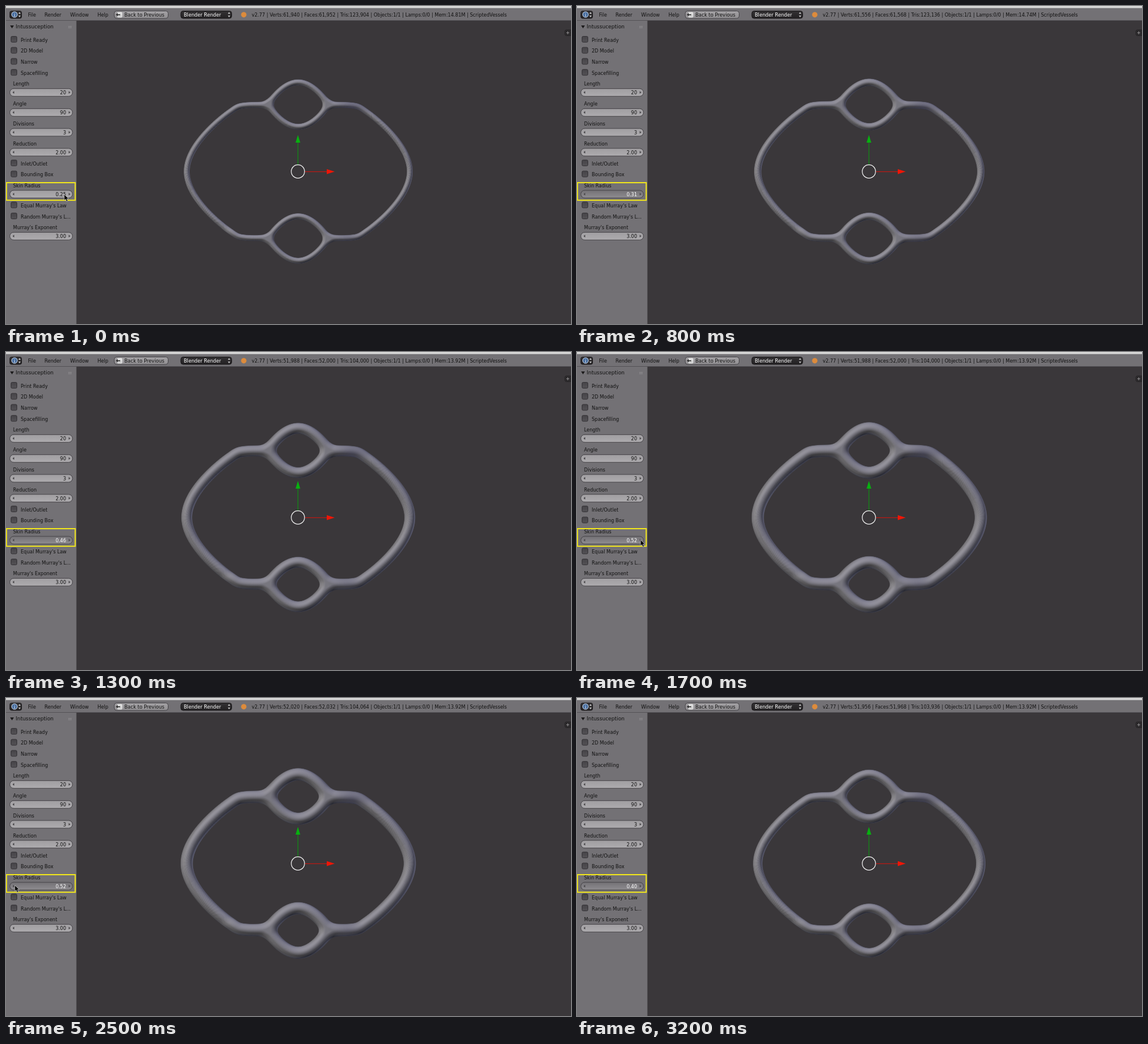
Write an HTML page with a canvas that moves like this. It is 960x540 px and loops after 3.3 s.

```html
<!DOCTYPE html>
<html lang="en">
<head>
<meta charset="utf-8">
<title>Skin radius</title>
<style>
html, body { margin: 0; width: 100%; height: 100%; overflow: hidden; background: #3a373a; }
canvas { display: block; width: 960px; height: 540px; }
</style>
</head>
<body>
<canvas id="stage" width="960" height="540"></canvas>
<script>
const STEP = 100, STEPS = 33;
const ctx = document.getElementById('stage').getContext('2d');

// [step, skin radius], linear in between
const RADIUS = [[0, .25], [6, .25], [8, .31], [12, .45], [13, .46], [17, .52],
  [19, .55], [24, .55], [27, .46], [31, .40], [32, .40]];
// [step, vertices, memory], held
const STATS = [[0, 61940, '14.81'], [8, 61556, '14.74'], [11, 51956, '13.92'],
  [13, 51988, '13.92'], [19, 52020, '13.92'], [28, 51988, '13.92'], [30, 51956, '13.92']];
// [step, x, y], held; no x means hidden
const POINTER = [[0, 99, 320], [7], [17, 108, 319], [19, 78, 318], [20, 46, 318],
  [21, 28, 317.5], [22, 22, 318], [24, 15, 318], [28]];

const held = (table, step) => table.filter(row => row[0] <= step).pop();
const pressed = step => (step >= 6 && step < 19) || step >= 25;

function radiusAt(step) {
  const i = Math.max(1, RADIUS.findIndex(row => row[0] >= step));
  const [s0, r0] = RADIUS[i - 1], [s1, r1] = RADIUS[i];
  return Math.round((r0 + (r1 - r0) * (step - s0) / (s1 - s0)) * 100) / 100;
}

function makeLayer(width = 960, height = 540) {
  const c = document.createElement('canvas');
  c.width = width;
  c.height = height;
  return c.getContext('2d');
}

function text(g, str, x, y, { size = 8.03, color = '#111', align = 'left' } = {}) {
  g.font = `${size}px "DejaVu Sans", sans-serif`;
  g.fillStyle = color;
  g.textAlign = align;
  g.fillText(str, x, y + 3);
}

function poly(g, points, color) {
  g.beginPath();
  points.forEach(([x, y]) => g.lineTo(x, y));
  g.closePath();
  g.fillStyle = color;
  g.fill();
}

function box(g, x, y, w, h, r, top, bottom, edge) {
  const fill = g.createLinearGradient(0, y, 0, y + h);
  fill.addColorStop(0, top);
  fill.addColorStop(1, bottom);
  g.beginPath();
  g.roundRect(x, y, w, h, r);
  g.fillStyle = fill;
  g.fill();
  g.strokeStyle = edge;
  g.lineWidth = 1;
  g.stroke();
}

function slider(g, y, value, down) {
  const shades = down ? ['#747276', '#8e8c90'] : ['#a09ea1', '#adabae'];
  box(g, 6.5, y - 6.5, 106.5, 13, 6.5, ...shades, '#464448');
  for (const [x, d] of [[11, 3], [109.5, -3]])
    poly(g, [[x, y], [x + d, y - 2.2], [x + d, y + 2.2]], '#4a484b');
  text(g, value, 102, y + .5, { align: 'right', color: down ? '#fff' : '#111' });
}

function checkbox(g, y, label) {
  box(g, 8.5, y - 5.5, 10, 10, 2, '#464448', '#535155', '#343236');
  text(g, label, 25, y + .5);
}

function chevrons(g, x, y) {
  poly(g, [[x - 2, y - 1.5], [x + 2, y - 1.5], [x, y - 4.5]], '#ccc');
  poly(g, [[x - 2, y + 1.5], [x + 2, y + 1.5], [x, y + 4.5]], '#ccc');
}

function drawHeader(g) {
  g.fillStyle = '#737175';
  g.fillRect(0, 0, 960, 25);
  g.fillStyle = '#d8d8d7';
  g.fillRect(0, 0, 960, 3.5);
  g.fillStyle = '#545256';
  g.fillRect(0, 24, 960, 1);

  box(g, 6.5, 8.5, 20, 12.5, 3, '#343234', '#232123', '#1a181a');
  g.beginPath();
  g.arc(14.5, 14.5, 4.8, 0, 7);
  g.fillStyle = '#4a6fa0';
  g.fill();
  g.strokeStyle = '#d5dfec';
  g.stroke();
  text(g, 'i', 14.5, 14.6, { size: 7.5, color: '#fff', align: 'center' });
  chevrons(g, 23, 14.7);

  [['File', 37.5], ['Render', 65.5], ['Window', 109], ['Help', 155.5]]
    .forEach(([label, x]) => text(g, label, x, 15));

  box(g, 184, 8.5, 91.5, 12.5, 4, '#a3a1a4', '#918f92', '#464448');
  box(g, 189.5, 11, 7.5, 8, 1, '#e0e0e0', '#c4c4c4', '#eee');
  poly(g, [[186.5, 14.8], [190, 12], [190, 17.6]], '#333');
  g.fillStyle = '#333';
  g.fillRect(190, 14, 4, 1.6);
  text(g, 'Back to Previous', 201, 15, { size: 8.2 });

  box(g, 297, 8.5, 86.5, 12.5, 4, '#333133', '#232123', '#191719');
  text(g, 'Blender Render', 302, 15, { size: 8.2, color: '#fff' });
  chevrons(g, 379, 14.7);

  g.beginPath();
  g.arc(404, 14.8, 4.6, 0, 7);
  g.fillStyle = '#dc8b3c';
  g.fill();
}

function drawPanel(g) {
  g.fillStyle = '#737175';
  g.fillRect(0, 25, 119.5, 515);
  g.fillStyle = '#5c5a5e';
  g.fillRect(119, 25, 1, 515);
  poly(g, [[7, 33], [13.4, 33], [10.2, 38]], '#1b1a1b');
  text(g, 'Intussuception', 16.5, 35.4, { size: 8.75 });
  g.fillStyle = '#9b999c';
  for (let x = 106; x < 112; x += 2)
    for (const y of [34, 36.3]) g.fillRect(x, y, 1.2, 1.2);

  [['Print Ready', 57], ['2D Model', 75.7], ['Narrow', 94.5], ['Spacefilling', 113.2],
   ['Inlet/Outlet', 267], ['Bounding Box', 285.7], ['Equal Murray\'s Law', 338.3],
   ['Random Murray\'s L...', 357]].forEach(([label, y]) => checkbox(g, y, label));

  [['Length', 132, '20'], ['Angle', 166, '90'], ['Divisions', 199.7, '3'],
   ['Reduction', 233.5, '2.00'], ['Skin Radius', 304.7], ['Murray\'s Exponent', 376, '3.00']]
    .forEach(([label, y, value]) => {
      text(g, label, 12, y + .3);
      if (value) slider(g, y + 14.8, value, false);
    });
}

function drawBackdrop(g) {
  g.fillStyle = '#3a373a';
  g.fillRect(0, 0, 960, 540);
  drawHeader(g);
  drawPanel(g);
  box(g, 949.5, 40.5, 12, 10, 3, '#2c2a2c', '#2c2a2c', '#262426');
  g.fillStyle = '#8a888a';
  g.fillRect(952, 45, 5, 1);
  g.fillRect(954, 43, 1, 5);
}

// Centrelines of one vessel quarter, measured outward from the middle:
// a start point, then one or more Bézier segments.
const CURVES = [
  [[0, 151.5], [20.5, 151.5, 40.5, 131, 50.5, 113.8]],
  [[0, 76], [20.5, 76, 40.5, 96, 50.5, 113.8]],
  [[50.5, 113.8], [61, 112, 79, 114.5, 96.5, 111.5],
    [105, 110, 110, 105.5, 116.5, 101], [136.5, 87, 189.5, 43, 189.5, 0]]
];
const MID_X = 496, MID_Y = 281, HALF_W = 210, HALF_H = 170, BLEND = 3;

function sample([[x, y], ...segments], count = 160) {
  const points = [];
  for (const [x1, y1, x2, y2, x3, y3] of segments) {
    for (let i = 0; i <= count; i++) {
      const t = i / count, s = 1 - t;
      const mix = (a, b, c, d) => s * s * s * a + 3 * s * s * t * b + 3 * s * t * t * c + t * t * t * d;
      points.push([mix(x, x1, x2, x3), mix(y, y1, y2, y3)]);
    }
    [x, y] = [x3, y3];
  }
  return points;
}

// Smoothly joined distance to the centrelines, and the direction away from them.
function fieldAt(u, v, lines) {
  let sum = 0, gu = 0, gv = 0;
  for (const points of lines) {
    let best = Infinity, bu = 0, bv = 0;
    for (const [pu, pv] of points) {
      const du = u - pu, dv = v - pv, d2 = du * du + dv * dv;
      if (d2 < best) [best, bu, bv] = [d2, du, dv];
    }
    const d = Math.sqrt(best) || 1e-6, weight = Math.exp(-d / BLEND);
    sum += weight;
    gu += weight * bu / d;
    gv += weight * bv / d;
  }
  return [Math.max(0, -BLEND * Math.log(sum)), gu / sum, gv / sum];
}

const lines = CURVES.map(curve => sample(curve));
const field = Array.from({ length: HALF_H }, (_, j) =>
  Array.from({ length: HALF_W }, (_, i) => fieldAt(i, j + .5, lines)));

// Direction (right, up, towards the viewer) and colour
const LIGHTS = [
  [[-.685, .23, .691], [.62, .61, .63]],
  [[.747, .585, .315], [.42, .42, .51]],
  [[.44, -.79, -.43], [.38, .39, .48]]
];

function shade(nx, ny) {
  const nz = Math.sqrt(Math.max(0, 1 - nx * nx - ny * ny));
  const rgb = [0, 0, 0];
  for (const [[lx, ly, lz], color] of LIGHTS) {
    const lit = 204 * Math.max(0, nx * lx + ny * ly + nz * lz);
    color.forEach((c, n) => rgb[n] += c * lit);
  }
  const shine = 18 * Math.max(0, -.373 * nx + .125 * ny + .92 * nz) ** 16;
  return rgb.map(c => c + shine);
}

const tube = makeLayer(2 * HALF_W, 2 * HALF_H);

// [x, y, rx, ry, color, alpha]
const TINTS = [
  [588, 172, 34, 20, '62,61,86', .5],
  [580, 394, 34, 18, '66,65,90', .3],
  [380, 381, 18, 10, '165,163,168', .35]
];

function tint([x, y, rx, ry, rgb, alpha]) {
  tube.save();
  tube.translate(x - MID_X + HALF_W, y - MID_Y + HALF_H);
  tube.scale(rx, ry);
  const glow = tube.createRadialGradient(0, 0, 0, 0, 0, 1);
  glow.addColorStop(0, `rgba(${rgb},${alpha})`);
  glow.addColorStop(1, `rgba(${rgb},0)`);
  tube.fillStyle = glow;
  tube.fillRect(-1, -1, 2, 2);
  tube.restore();
}

function drawVessel(radius) {
  const size = radius * 20;
  const image = tube.createImageData(2 * HALF_W, 2 * HALF_H);
  for (let y = 0; y < 2 * HALF_H; y++) {
    const dy = y - HALF_H;
    for (let x = 1; x < 2 * HALF_W; x++) {
      const dx = x - HALF_W;
      const [d, gu, gv] = field[dy < 0 ? -1 - dy : dy][Math.abs(dx)];
      const cover = Math.min(1, size - d + .5);
      if (cover <= 0) continue;
      const slope = Math.min(1, d / size);
      const rgb = shade(slope * gu * Math.sign(dx), slope * gv * (dy < 0 ? 1 : -1));
      image.data.set([...rgb, 255 * cover], 4 * (y * 2 * HALF_W + x));
    }
  }
  tube.putImageData(image, 0, 0);
  tube.globalCompositeOperation = 'source-atop';
  TINTS.forEach(tint);
  ctx.drawImage(tube.canvas, MID_X - HALF_W, MID_Y - HALF_H);
}

function line(x0, y0, x1, y1, color) {
  ctx.beginPath();
  ctx.moveTo(x0, y0);
  ctx.lineTo(x1, y1);
  ctx.strokeStyle = color;
  ctx.lineWidth = 1.2;
  ctx.stroke();
}

function drawGizmo() {
  line(496, 269, 496, 231, '#0f8f14');
  poly(ctx, [[496, 219], [492, 232], [500, 232]], '#08b010');
  line(508, 281.3, 546, 281.3, '#b81a14');
  poly(ctx, [[558.5, 281.3], [545, 277], [545, 285.6]], '#ee1607');
  ctx.beginPath();
  ctx.arc(496, 281, 11.3, 0, 7);
  ctx.strokeStyle = '#f2f2f2';
  ctx.lineWidth = 1.2;
  ctx.stroke();
}

function drawPointer(x, y) {
  ctx.save();
  ctx.translate(x, y);
  ctx.strokeStyle = '#ddd';
  poly(ctx, [[0, 0], [0, 10], [2.3, 8], [4, 12], [6, 11.2], [4.2, 7.3], [7.3, 7.2]], '#000');
  ctx.lineWidth = .6;
  ctx.stroke();
  ctx.restore();
}

const backdrop = makeLayer();
drawBackdrop(backdrop);

function draw(step) {
  const radius = radiusAt(step);
  const [, verts, mem] = held(STATS, step);
  const [, px, py] = held(POINTER, step);
  const faces = verts + 12;
  const num = n => n.toLocaleString('en-US');
  ctx.drawImage(backdrop.canvas, 0, 0);
  text(ctx, `v2.77 | Verts:${num(verts)} | Faces:${num(faces)} | Tris:${num(faces * 2)}` +
    ` | Objects:1/1 | Lamps:0/0 | Mem:${mem}M | ScriptedVessels`, 417.5, 15);
  drawVessel(radius);
  drawGizmo();
  slider(ctx, 319.5, radius.toFixed(2), pressed(step));
  ctx.strokeStyle = '#f0e51c';
  ctx.lineWidth = 2;
  ctx.strokeRect(.8, 300, 116.8, 29.8);
  if (px !== undefined) drawPointer(px, py);
}

const start = performance.now();
let shown = -1;
function tick() {
  const step = Math.floor((performance.now() - start) / STEP) % STEPS;
  if (step !== shown) draw(shown = step);
  requestAnimationFrame(tick);
}
tick();
</script>
</body>
</html>
```
